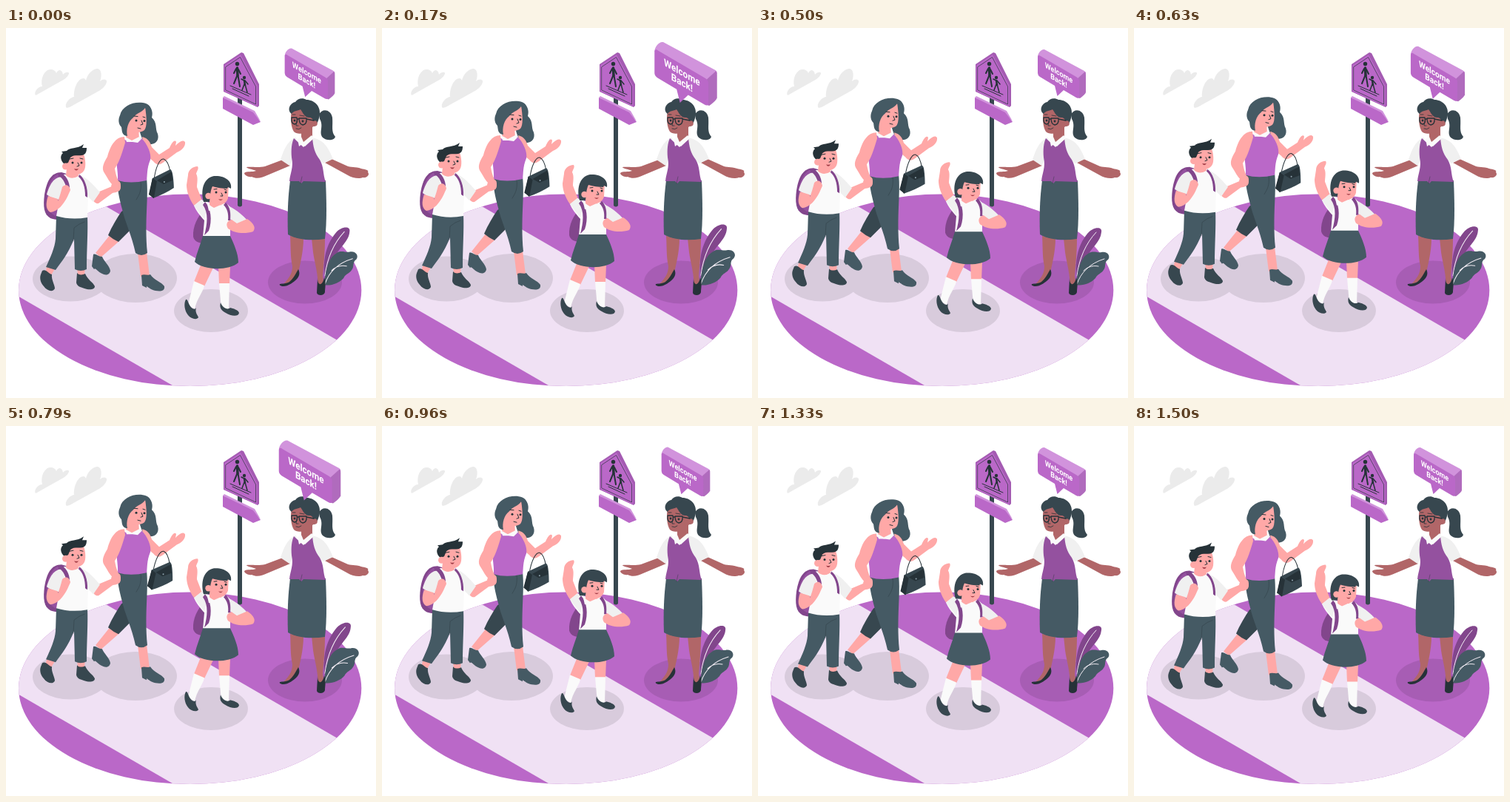
Write an HTML page that moves like this. It is 500 px wide and 500 px high and loops after 1540 ms.

```html
<!DOCTYPE html>
<html lang="en">
<head>
<meta charset="utf-8">
<title>Welcome back</title>
<style>
html, body { margin: 0; width: 100%; height: 100%; overflow: hidden; background: #fff; }
svg { display: block; width: 100%; height: 100%; }
.slate { fill: #455a64; }
.deep { fill: #37474f; }
.ink { fill: #263238; }
.skin { fill: #ffa8a7; }
.tan { fill: #b16668; }
.white { fill: #fafafa; }
.sleeve { fill: #f0f0f0; }
.grey { fill: #ebebeb; }
.lilac { fill: #ba68c8; }
.plum { fill: #94519f; }
.pack { fill: #82468c; }
.line { fill: none; stroke: #263238; stroke-width: 1; stroke-linecap: round; stroke-linejoin: round; }
.vein { fill: none; stroke: #f3edf4; stroke-width: 1; stroke-linecap: round; }
text { font: 700 10.4px Roboto, sans-serif; fill: #fff; text-anchor: middle; }
</style>
</head>
<body>
<svg viewBox="0 0 500 500">
  <clipPath id="disc"><ellipse cx="248.7" cy="354.3" rx="231.6" ry="129.7"/></clipPath>

  <!-- ground -->
  <g clip-path="url(#disc)">
    <path class="lilac" d="M0 200H500V500H0Z"/>
    <path fill="#f0e1f4" d="M135 241L447 421.500L400 500H255L225 483L0 353V241Z"/>
  </g>
  <g fill="#d8cbdc">
    <ellipse cx="87" cy="339" rx="51" ry="30.500"/>
    <ellipse cx="175" cy="338" rx="56" ry="33"/>
    <ellipse cx="277" cy="382" rx="50" ry="29"/>
  </g>
  <ellipse cx="404" cy="343.500" rx="50" ry="29" fill="#a75db4"/>

  <!-- clouds -->
  <path class="grey" d="M40 91C37 87 43 79 49 79C46 67 53 56 60 56C64 56 67 58 68 61C71 55 76 56 77 63C80 59 86 59 85 62C83 67 78 70 74 72L42 90Z"/>
  <path class="grey" d="M82 108C78 104 85 94 92 93C91 82 97 68 105 68Q107 68 108 71C110 62 117 55 124 55C129 56 130 64 127 72C131 68 137 69 136 73C135 79 128 84 122 87L86 107Z"/>

  <!-- road sign -->
  <path class="deep" d="M313 90H319V240Q316 243 313 240Z"/>
  <path fill="#a45bb2" d="M294 49L318 33L321 34L342 76V105L340 107L294 86Z"/>
  <path class="lilac" d="M295 50.500L317 36L339.500 78V106L295 85.500Z"/>
  <path class="line" stroke-opacity=".65" stroke-width=".8" d="M297 52.500L316.500 39.500L337.500 79V103L297 84Z"/>
  <g class="line">
    <path d="M303 78L331 90M306 82L328 92"/>
    <path stroke-width="3.500" d="M312.500 54L313 64"/>
    <path stroke-width="2" d="M312.500 64L308 75M313.500 64L316 79M311 55L308 61M314 56L317 62"/>
    <path stroke-width="2.500" d="M322 71L323 77"/>
    <path stroke-width="1.500" d="M322 76L319 84M323 76L326 87M322 71L318 69M323 71L327 76"/>
  </g>
  <circle class="ink" cx="312.500" cy="48.500" r="2.700"/>
  <circle class="ink" cx="322" cy="67" r="2.200"/>
  <path fill="#d193dc" d="M293 94L295 92L336 112L344 126L333 116Z"/>
  <path class="lilac" d="M293 94L334 114L344 127L334 131L293 109Z"/>

  <!-- plant -->
  <g id="plant">
    <path class="pack" d="M431 336C428 318 431 295 445 278C453 268 466 268 464 276C463 289 450 297 445 309C440 322 434 340 432 346Z"/>
    <path class="vein" d="M431 335C434 311 443 291 457 276"/>
    <path class="slate" d="M430 347C432 330 434 312 446 305C452 300 458 304 464 303C472 301 477 308 473 313C467 317 471 322 467 327C464 332 459 332 456 338C450 345 438 349 430 347Z"/>
    <path class="vein" d="M431 346C436 331 448 318 468 312M440 328C447 321 455 321 460 322"/>
  </g>

  <!-- teacher -->
  <g>
    <path class="deep" d="M423 117C427 108 439 110 441 121C442 133 439 140 445 147C443 153 432 152 428 148C422 141 430 133 424 123Z"/>
    <path class="tan" d="M384 281L402 284C402 303 397 320 395 331L384 343L375 346C384 337 387 330 387 322C384 308 385 295 384 281ZM413 284L431 285C431 305 429 322 428 335L430 350L421 352C423 335 417 318 415 303Z"/>
    <path class="ink" d="M370 346C374 345 378 346 383 343C389 338 392 331 395 326C397 330 397 334 394 338C389 344 381 349 375 349C371 349 369 347 370 346ZM421 338C421 349 428 349 430 337C433 344 431 352 431 357C430 362 421 362 420 358Z"/>
    <path class="tan" d="M374 178L350 187C341 189 330 187 325 188C325 190 334 191 338 193C333 195 325 193 322 196C322 199 328 202 332 201C338 204 345 203 353 199L384 186ZM431 182L462 199C468 203 478 204 482 202C488 203 492 198 489 195C491 192 485 191 480 190C472 187 466 189 460 186L440 177Z"/>
    <path class="sleeve" d="M392 148C380 152 375 166 371 178L383 186L394 168ZM412 148C430 150 436 163 442 177L429 183L412 170Z"/>
    <path class="slate" d="M384 206H432C433 232 434 260 431 285C412 288 393 286 381 279C380 252 381 229 384 206Z"/>
    <path class="plum" d="M389 149L402 161L414 148C415 160 417 169 424 178C430 188 428 198 432 208L402 207L399 210L396 207L383 207C384 196 389 188 386 175C385 165 386 155 389 149Z"/>
    <path class="line" stroke-opacity=".4" stroke-width=".8" d="M398 210L400 201"/>
    <path class="tan" d="M399 136L414 130L414 151C410 155 402 157 399 152Z"/>
    <path class="white" d="M394 150L399 147L402 154L413 145L416 149L404 160L400 157L396 160Z"/>
    <path class="tan" d="M386 110C384 122 385 134 389 140C394 145 405 143 411 136L420 130L418 110Z"/>
    <path class="deep" d="M386 116C379 111 384 101 391 100C394 95 401 94 406 97C417 97 425 106 424 116C423 126 419 132 416 133C417 127 415 122 411 121C404 122 401 114 398 110C394 112 388 112 386 116Z"/>
    <circle class="tan" cx="417" cy="129" r="3.800"/>
    <g class="line">
      <path stroke-width="1.300" d="M386 121L393 121Q395 129 390 130Q385 129 386 121ZM396 122H406Q407 130 401 131Q396 130 396 122ZM393 123H396M406 123L416 125"/>
      <path stroke-width=".8" d="M387 117L391 117M397 118L403 119M393 125L392 132L395 132M392 136Q396 138 399 135"/>
    </g>
    <circle class="ink" cx="390" cy="125" r="1.400"/><circle class="ink" cx="401" cy="126" r="1.400"/>
  </g>

  <!-- speech bubble, text centred on its front face -->
  <g id="bubble">
    <path fill="#d193dc" d="M378 39C378 34 383 28 387 29L441 58Q443 59 443 62L431 69Z"/>
    <path fill="#b06bbd" d="M431 69L442 59Q443 60 443 63V87Q442 90 435 95L431 94Z"/>
    <path class="lilac" d="M378 40Q378 35 382 38L430 66Q434 68 434 72V92Q434 96 430 94L413 84L404.500 92L401 78L381 66Q378 64 378 61Z"/>
    <g transform="matrix(.866 .5 0 1 406.500 64)"><text>Welcome</text><text y="10.600">Back!</text></g>
  </g>

  <!-- mother -->
  <g class="float">
    <path class="slate" d="M182 102C194 101 200 111 197 121C205 128 201 136 205 143C208 153 200 160 189 156C180 148 176 125 182 102Z"/>
    <path class="skin" d="M141 279L121 304L128 310L153 288ZM178 304L182 336L194 335L190 303Z"/>
    <path class="deep" d="M156 248C150 257 143 268 138 280Q145 286 152 289L167 274L180 235Z"/>
    <path class="slate" d="M118 306C121 304 124 309 130 309C132 315 140 321 141 328C140 335 133 334 130 332C123 329 121 323 119 326L116 322ZM183 334C187 332 192 335 195 333C200 341 210 343 214 349C215 356 208 356 202 355C196 354 192 350 190 349V351L184 348Z"/>
    <path class="slate" d="M151 205L190 203C193 230 187 260 191 304Q183 310 175 304C170 280 160 260 157 245C153 230 150 217 151 205Z"/>
    <path class="line" stroke-opacity=".35" d="M182 207C184 222 178 228 176 232"/>
    <path class="skin" d="M184 147C192 149 195 154 197 161L207 171L221 162C224 155 228 150 230 154L229 159C234 154 239 150 242 154C243 160 237 166 231 168L212 182C207 186 203 185 199 180L189 172ZM163 128L179 132L180 151Q172 156 162 150Z"/>
    <path class="lilac" d="M158 149C166 156 177 155 183 149C191 156 197 171 195 178C190 190 191 200 190 206Q168 211 151 206C152 192 147 180 151 170Z"/>
    <path class="skin" d="M160 147C148 147 141 159 137 174C131 184 129 190 133 196C138 204 140 208 143 211C140 216 145 221 150 221C157 221 155 211 152 207C149 201 148 195 147 190C154 180 158 165 161 155Z"/>
    <path class="white" d="M161 147L170 152L180 147L183 150L178 155L171 154L163 154Z"/>
    <path class="skin" d="M171 110C165 117 161 127 164 139C170 143 182 142 187 138C191 133 190 120 188 107Z"/>
    <path class="slate" d="M164 146C156 145 157 139 156 134C151 129 152 122 154 118C157 105 172 99 185 101C192 102 196 106 196 111Q191 111 188 108C184 114 176 115 172 121C165 126 162 137 164 146Z"/>
    <path class="line" stroke-width=".9" d="M173 119L178 119.500M185 120L188 121M183 125L185 130L182 131M178 135L182 136"/>
    <circle class="ink" cx="176" cy="125" r="1.500"/><circle class="ink" cx="187" cy="125.500" r="1.500"/>
    <g id="bag">
      <path class="line" stroke-width="2" d="M200 206C202 188 208 176 213 177Q219 179 222 194"/>
      <path class="deep" d="M198 203L222 191Q226 192 227 216Q215 224 199 230L194 224Z"/>
      <path class="ink" d="M198 203L204 207L200 230L193 225ZM204 206L224 194L225 206L213 211Z"/>
      <circle cx="214" cy="208" r="1" fill="#90a4ae"/>
    </g>
  </g>

  <!-- boy -->
  <g class="float">
    <path class="pack" d="M75 195C61 195 55 207 52 225C50 241 51 252 60 257C70 261 80 258 83 250L92 200Z"/>
    <path class="plum" d="M70 197C60 203 55 216 55 230C55 244 59 252 70 255L80 230Z"/>
    <path class="skin" d="M56 320L53 331L61 334L68 322ZM96 322L97 335L106 334L107 322Z"/>
    <path class="deep" d="M49 328C54 325 57 332 62 333C61 340 66 347 66 352C64 357 56 356 51 349C47 345 45 338 47 333ZM96 331C100 335 104 333 107 332C110 340 118 344 120 349C120 354 112 354 106 352C100 350 96 349 95 344Z"/>
    <path class="skin" d="M124 222L143 214C148 205 155 205 155 212C156 221 149 222 144 223L125 237C121 238 118 234 116 230Z"/>
    <path class="slate" d="M68 253L110 254C111 275 109 300 109 326Q101 330 93 326L92 285C84 305 75 316 67 327L54 323C60 310 66 297 67 285Z"/>
    <path class="line" stroke-opacity=".35" d="M106 262Q99 264 92 270L91 288"/>
    <path class="white" d="M78 198L99 196C107 200 110 212 111 225L110 256Q88 260 68 254L72 232Z"/>
    <path class="sleeve" d="M77 201C64 201 59 212 55 225Q64 232 72 232L79 212ZM104 201C115 207 120 215 127 222L118 235L109 226Z"/>
    <path class="pack" d="M76 197C83 201 87 211 86 221L82 223C82 211 77 204 73 201ZM99 198C106 202 111 216 110 229L107 227C107 215 104 206 98 201Z"/>
    <path class="skin" d="M57 227C53 238 54 246 60 249C70 248 78 238 83 228L87 219C86 212 80 210 76 215C74 222 73 227 70 234L70 231ZM82 190L97 194L98 200Q88 206 81 199Z"/>
    <path class="skin" d="M82 172C78 185 83 196 92 198C100 199 106 195 107 188C108 180 106 172 104 168Z"/>
    <path class="ink" d="M79 184C73 179 73 172 77 169L75 167L82 166C86 161 96 164 105 157L103 162L109 162C109 168 107 171 103 172C97 173 91 171 87 175L84 182Z"/>
    <circle class="skin" cx="80.500" cy="187" r="4.500"/>
    <path class="line" stroke-width=".9" d="M86 177L91 176M100 176L104 177M97 182L99 186L96 187"/>
    <circle class="ink" cx="90" cy="182" r="1.500"/><circle class="ink" cx="102" cy="182" r="1.500"/>
    <path fill="#a33d47" d="M92 190Q95 191 98 190Q95 195 92 190Z"/>
  </g>

  <!-- girl -->
  <g class="float">
    <path class="pack" d="M268 245C259 255 252 268 253 282C255 290 264 292 271 290L275 250Z"/>
    <path class="skin" d="M264 318L280 324L268 349L254 343ZM287 322L303 321L302 347L288 346Z"/>
    <path class="white" d="M254 342L268 348C266 358 258 365 255 380L246 374ZM288 345H302L301 380H291Z"/>
    <path class="deep" d="M243 367C246 365 246 375 252 379Q256 381 257 378C255 384 259 388 260 391C258 395 250 393 246 388C241 382 240 372 243 367ZM290 371C292 377 299 382 303 378C307 379 314 381 315 385C314 391 303 389 297 385C291 382 288 378 290 371Z"/>
    <path class="skin" d="M246 199C246 192 252 187 259 187C261 190 258 193 257 197C260 202 258 210 258 215L265 233L254 240C247 230 244 220 244 212Z"/>
    <path class="white" d="M254 240L264 232L277 237L297 237C305 240 305 250 303 260L303 283H266L268 260C261 252 257 247 254 240Z"/>
    <path class="sleeve" d="M254 240L264 232L272 243L268 258ZM302 241C313 247 320 253 327 261L313 267L303 258Z"/>
    <path class="pack" d="M269 235C277 243 279 260 274 274L268 280C272 265 274 250 266 239ZM297 236C303 242 304 250 303 260L300 260C301 251 299 244 294 239Z"/>
    <path class="skin" d="M326 258C335 264 338 270 334 275C322 279 308 277 300 271C296 264 300 260 305 259L312 264ZM275 228L291 234L291 242Q282 247 275 239Z"/>
    <path class="white" d="M272 238L281 243L290 239L294 243L287 248L281 245L274 247Z"/>
    <path class="slate" d="M266 281H303C308 292 314 305 314 317C300 329 266 327 255 316C258 303 263 292 266 281Z"/>
    <path class="skin" d="M274 211C271 224 275 235 283 239C290 241 298 237 300 230L301 210Z"/>
    <path class="deep" d="M267 235C263 220 266 203 281 200C296 199 306 207 304 217L300 215L299 217C293 217 285 216 279 214C276 220 276 227 275 235Z"/>
    <circle class="skin" cx="273.500" cy="227" r="4.200"/>
    <path class="line" stroke-width=".9" d="M281 218L285 217.500M295 218L298 219M291 223L293 227L290 227"/>
    <circle class="ink" cx="284" cy="222" r="1.500"/><circle class="ink" cx="297" cy="222" r="1.500"/>
    <path fill="#a33d47" d="M287 231Q290 232 293 231Q290 235 287 231Z"/>
  </g>
</svg>
<script>
const LOOP = 1540;
const $ = id => document.getElementById(id);
const floaters = document.querySelectorAll('.float');

const scaleAbout = (s, x, y) => `translate(${x} ${y}) scale(${s}) translate(${-x} ${-y})`;

// smooth bump from 0 to 1 and back, centred on a time
function bump(t, centre) {
  const d = Math.abs(t - centre) / 230;
  return d < 1 ? (1 + Math.cos(Math.PI * d)) / 2 : 0;
}

function draw(now) {
  const t = now % LOOP;
  const beat = bump(t, 175) + bump(t, 758);
  const lift = 1 - Math.abs(2 * (((t + 40) % LOOP) / LOOP) - 1);

  $('bubble').setAttribute('transform', scaleAbout(1 + 0.3 * beat, 410.5, 62));
  $('plant').setAttribute('transform', scaleAbout(1 + 0.06 * beat, 432, 348));
  $('bag').setAttribute('transform', `rotate(${3 * lift} 212 178)`);
  floaters.forEach(f => f.setAttribute('transform', `translate(0 ${0.5 - 9 * lift})`));
}

const start = performance.now();
function frame() {
  draw(performance.now() - start);
  requestAnimationFrame(frame);
}
frame();
</script>
</body>
</html>
```
